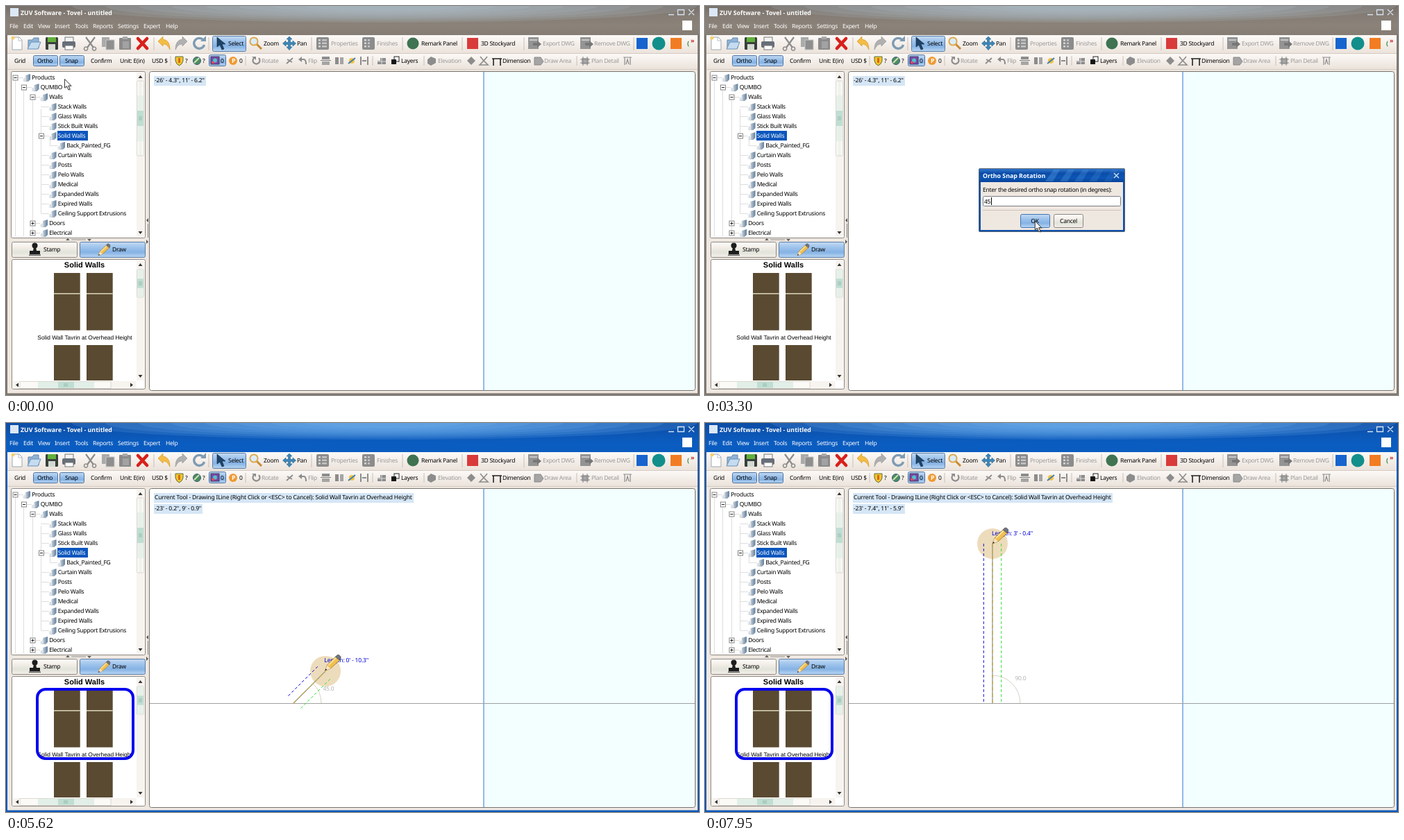
Write an HTML page that moves like this. It is 998x561 px and loops after 8 s.

```html
<!DOCTYPE html>
<html lang="en">
<head>
<meta charset="utf-8">
<title>Wall drawing</title>
<style>
html, body { margin: 0; width: 100%; height: 100%; overflow: hidden; background: #efe8e1; }
svg { position: absolute; left: 0; top: 0; width: 998px; height: 561px; }
svg text, .tip { font: 8.5px "Noto Sans", "Open Sans", sans-serif; letter-spacing: -.28px; text-rendering: geometricPrecision; white-space: pre; }
svg text.b { font-weight: 700; font-size: 8.8px; letter-spacing: 0; }
svg text.a { font: 8.4px "Liberation Sans", sans-serif; letter-spacing: 0; }
svg text.h { font: 700 11px "Liberation Sans", sans-serif; letter-spacing: 0; }
.mid { text-anchor: middle; }
.tip, svg #len { letter-spacing: -.17px; }
.tip { position: absolute; left: 213px; height: 14px; line-height: 14px; padding: 0 2px 0 1px; background: #d5e6f6; color: #000; }
</style>
</head>
<body>
<svg id="back" viewBox="0 0 998 561"></svg>
<div class="tip" id="tool" style="top:101px">Current Tool - Drawing ILine (Right Click or &lt;ESC&gt; to Cancel): Solid Wall Tavrin at Overhead Height</div>
<div class="tip" id="coord"></div>
<svg id="front" viewBox="0 0 998 561"></svg>
<script>
const $ = id => document.getElementById(id);
const R = (x, y, w, h, fill, more = '') => `<rect x="${x}" y="${y}" width="${w}" height="${h}" fill="${fill}" ${more}/>`;
const P = (d, fill = 'none', stroke = 'none', w = 1, more = '') => `<path d="${d}" fill="${fill}" stroke="${stroke}" stroke-width="${w}" ${more}/>`;
const C = (x, y, r, fill, more = '') => `<circle cx="${x}" cy="${y}" r="${r}" fill="${fill}" ${more}/>`;
const T = (x, y, s, fill = '#000', cls = '') => `<text x="${x}" y="${y}" fill="${fill}" class="${cls}">${s}</text>`;
const grad = (id, stops, dir = 'x2="0" y2="1"') => `<linearGradient id="${id}" ${dir}>` +
  stops.map((c, i) => `<stop offset="${i / (stops.length - 1)}" stop-color="${c}"/>`).join('') + '</linearGradient>';
const line = stroke => `stroke="${stroke}"`;
const GREY = '#8c8c8c', OFF = '#999';

const defs = '<defs>' +
  grad('bar', ['#fcfaf8', '#f4eee9', '#ebe3db']) +
  grad('btn', ['#fffefc', '#f3eee8', '#e2e4da', '#f4efea']) +
  grad('on', ['#c4daf2', '#9fc4ec', '#85b2e4', '#b9d6f3']) +
  grad('act', ['#0d4ca4', '#0c55b3', '#0b5cc0', '#0a5cc0']) +
  grad('idle', ['#77706a', '#857d75', '#8b8279', '#857c73']) +
  grad('dlg', ['#2f77cd', '#0b4ca8', '#0b56b6', '#0a4398']) +
  grad('leaf', ['#f4f6f8', '#b4bfca', '#5f7f9f'], 'x2="1" y2="0"') +
  grad('thumb', ['#fdfcfa', '#eef1ea', '#fdfcfa'], 'x2="1" y2="0"') +
  '</defs>';

// title bar with stepped glow, plus window edges
function frame(id, base, glow, edge) {
  let s = R(0, 0, 998, 42, `url(#${base})`);
  for (let i = 0; i < 8; i++)
    s += `<ellipse cx="545" cy="0" rx="${450 - i * 48}" ry="${24 - i * 2.4}" fill="${glow}" opacity=".17"/>`;
  s += R(0, 41, 2, 520, edge) + R(996, 41, 2, 520, edge) + R(0, 558.5, 998, 2.5, edge);
  return `<g id="${id}">${s}</g>`;
}

function titleText() {
  let s = R(6, 3, 12, 12, '#dce8f5') + T(21, 12.5, 'ZUV Software - Tovel - untitled', '#fff', 'b');
  const menu = { File: 5, Edit: 25, View: 46, Insert: 70, Tools: 99, Reports: 125, Settings: 161, Expert: 198, Help: 230 };
  for (const k in menu) s += T(menu[k], 32, k, '#fff');
  s += R(974, 21, 14, 14, '#fff');
  return s + P('M954 12.5H962M967.5 5.5H976.5V12.5H967.5ZM983 5L991 13M991 5L983 13', 'none', '#d5e2f0', 1.3);
}

function toolbar() {
  let s = R(2, 42, 994, 26, 'url(#bar)') + R(2, 68, 994, 23, 'url(#bar)') + P('M2 68.5H996M2 91.5H996', 'none', '#d5cbc2');
  for (const x of [213, 292, 440, 571, 657, 746, 904]) s += P(`M${x} 45V64`, 'none', '#c9c0b7');
  for (const x of [237, 345, 528, 602, 822]) s += P(`M${x} 72V86`, 'none', '#c9c0b7');
  // file and edit
  s += P('M9 45H19L23 49V63H9Z', '#fff', '#9aa7b5') + P('M18 45V50H23', 'none', '#b5c0cc') + C(10, 46, 2.5, '#f4cf6b');
  s += P('M32 49H38L40 46H47V61H32Z', '#8fb4d8', '#6588aa') + P('M31 62L36 52H50L46 62Z', '#c5dcf0', '#6a90b8');
  s += R(57, 45, 18, 18, '#39403c', 'rx="1.5"') + R(60, 45, 12, 7, '#62b13c') + R(61, 55, 10, 8, '#d4dad2');
  s += R(85, 45, 12, 7, '#f4f4f4', line('#777')) + R(81, 51, 19, 9, '#666e78', 'rx="2"') + R(85, 57, 12, 6, '#fff', line('#777'));
  s += P('M115 45L126 60M128 45L117 60', 'none', GREY, 2.2) + P('M115 59a2.6 2.6 0 1 0 .1 0M127 59a2.6 2.6 0 1 0 .1 0', 'none', GREY, 1.6);
  s += R(138, 45, 11, 14, '#aaa') + R(144, 49, 12, 14, '#8e8e8e', line('#c8c8c8'));
  s += R(163, 46, 17, 17, '#8b8b8b', 'rx="1"') + R(168, 44, 7, 4, '#aaa') + R(168, 51, 9, 10, '#a2a2a2');
  s += P('M190 47L203 61M203 47L190 61', 'none', '#d8201a', 4.6, 'stroke-linecap="round"');
  s += P('M219 51L226 44V48Q236 49 236 63Q232 54 226 55V58Z', '#f3bd45', '#d49a2c', .7);
  s += P('M261 51L254 44V48Q244 49 244 63Q248 54 254 55V58Z', '#b0b0b0', '#989898', .7);
  s += P('M284 49A7.5 7.5 0 1 0 285.5 56', 'none', '#7e9bb3', 3.4) + P('M280 51H288V43Z', '#7e9bb3');
  // view tools
  s += R(297.5, 43.5, 48, 22, 'url(#on)', 'rx="2" stroke="#5a7ea8"') + P('M304 45V59L308 56L311 63L314 62L311 55H316Z', '#1f4468', '#0d2740', .6);
  s += P('M361 55L368 62', 'none', '#c88a35', 3) + C(357, 51, 5.6, '#d9ecfa', 'stroke="#e0a94c" stroke-width="2"');
  s += P('M408 44L412 48H409.5V52.5H413V50L417.5 54L413 58V55.5H409.5V59H412L408 63.5L404 59H406.5V55.5H403V58L398.5 54L403 50V52.5H406.5V48H404Z', '#3c86b8', '#23618c', .6);
  for (const x of [447, 513]) {
    s += R(x, 45, 18, 18, GREY, 'rx="2"');
    for (let i = 0; i < 3; i++) s += R(x + 3, 48 + i * 4.5, 3, 2.5, '#d5d5d5') + R(x + 8, 48 + i * 4.5, x < 500 ? 7 : 3, 2.5, '#c5c5c5');
  }
  s += C(586, 54, 8.5, '#3f7351') + R(664, 46, 16, 16, '#d93a3a');
  for (const x of [752, 827]) s += R(x, 45, 15, 17, '#949494') + R(x + 2, 48, 11, 2, '#c7c7c7') + P(`M${x + 7} 53H${x + 13}V50L${x + 19} 55L${x + 13} 60V57H${x + 7}Z`, '#777');
  s += R(908, 46, 16, 16, '#1764cf') + C(940, 54, 9.5, '#128f8b') + R(957, 46, 16, 16, '#f27c22');
  s += T(981, 57, '(', '#278737', 'b') + T(986, 53, '»', '#c52222', 'b');
  for (const [x, txt, c] of [[320, 'Select'], [371, 'Zoom'], [419, 'Pan'], [468, 'Properties', OFF], [534, 'Finishes', OFF], [598, 'Remark Panel'],
    [684, '3D Stockyard'], [773, 'Export DWG', OFF], [847, 'Remove DWG', OFF]]) s += T(x, 57, txt, c);
  // second row
  for (const x of [39.5, 77.5]) s += R(x, 71.5, 35, 15, 'url(#on)', 'rx="2" stroke="#4f74a2"');
  s += R(292.5, 70.5, 24, 16, 'url(#on)', 'rx="2" stroke="#4f74a2"');
  s += P('M244 73H255V79Q254 84 249.5 86Q245 84 244 79Z', '#f2c52d', '#5b6e3d') + R(248, 75, 3, 7, '#d86a18');
  s += C(275, 79, 5.5, '#4c8d60', line('#3c607a')) + P('M271 82L278 75', 'none', '#cfe3b5', 2);
  s += R(295, 73, 12, 11, '#7b47a8', line('#383860')) + C(301, 78.5, 3, '#4fc1c8') + R(296, 80, 4, 3, '#e04a60');
  s += C(327, 79, 6, '#ee9a32') + T(325, 82, 'P', '#fff', 'b');
  s += P('M364 75A5 5 0 1 1 357 75', 'none', GREY, 2.2) + P('M354 73H360V78Z', GREY) + P('M404 83L413 75M405 77L412 81', 'none', GREY, 1.8);
  s += P('M424 77H429Q432 77 432 84', 'none', GREY, 2) + P('M421 77L426 73V81Z', GREY);
  s += R(455, 73, 11, 4, GREY) + R(455, 80, 11, 5, '#a5a5a5') + P('M453 78.5H468', 'none', '#777') + R(474, 74, 5, 10, GREY) + R(481, 74, 5, 10, '#a5a5a5');
  s += C(498, 79, 4, '#f2c33e') + P('M493 83L503 75', 'none', '#3d80b5', 2) + P('M511 73V85M521 73V85M513 79H519', 'none', GREY, 2);
  s += P('M535 84V79H539V75H547V84Z', GREY) + P('M541 75V84M535 80H547', 'none', '#ddd') + R(559, 73, 7, 7, '#fff', line('#222')) + R(555, 77, 7, 7, '#151515');
  s += P('M607 77L612 73L619 76V82L612 86L607 83Z', GREY) + P('M664 79L670 73L676 79L670 85Z', GREY) + P('M683 73L688 79L693 73M682 85L688 79L694 85Z', 'none', GREY, 1.6);
  s += P('M702 86V76M712 86V76M700 76H714', 'none', '#222', 1.6) + P('M761 74H770L774 80L770 85H761Z', '#a5a5a5', '#888');
  s += R(829, 75, 10, 9, '#a9a9a9') + P('M827 77H841M827 82H841M831 73V86M837 73V86', 'none', '#888') + P('M889 74H901M891 74V85M899 74V85M893 84L895 77L897 84', 'none', GREY, 1.2);
  for (const [x, txt, c] of [[12, 'Grid'], [45, 'Ortho'], [85, 'Snap'], [122, 'Confirm'], [164, 'Unit: E(in)'], [210, 'USD $'], [258, '?'], [283, '?'],
    [309, '0'], [336, '0'], [368, 'Rotate', OFF], [435, 'Flip', OFF], [569, 'Layers'], [622, 'Elevation', OFF], [715, 'Dimension'],
    [775, 'Draw Area', OFF], [843, 'Plan Detail', OFF]]) s += T(x, 82, txt, c);
  return s;
}

function scrollV(x, top, bot, t0, t1) {
  const m = (t0 + t1) / 2, g = Math.min(11, (t1 - t0) / 6);
  return R(x, top, 11, bot - top, '#f7f3ef') + R(x + .5, t0, 10, t1 - t0, 'url(#thumb)', 'stroke="#ddd8d0" rx="1"') +
    R(x + 1, m - 3 * g, 9, 6 * g, '#e1efe8', 'opacity=".7"') + R(x + 1, m - g, 9, 2 * g, '#bfded3') +
    P(`M${x + 3} ${m - 2}h5m-5 2h5m-5 2h5`, 'none', '#8fb5a8', .8) +
    P(`M${x + 2.5} ${top + 8}l3 -4l3 4ZM${x + 2.5} ${bot - 8}l3 4l3 -4Z`, '#333');
}

function tree() {
  let s = R(7.5, 94.5, 193, 240, '#fff', 'rx="2" stroke="#8d8883"');
  s += P('M13.5 107V333M25.5 121V333M38.5 135V327M50.5 149V299M63.5 191V201', 'none', '#bbb', 1, 'stroke-dasharray="1 1"');
  const rows = [['Products', 0, '-'], ['QUMBO', 1, '-'], ['Walls', 2, '-'], ['Stack Walls', 3], ['Glass Walls', 3], ['Stick Built Walls', 3],
    ['Solid Walls', 3, '-'], ['Back_Painted_FG', 4], ['Curtain Walls', 3], ['Posts', 3], ['Pelo Walls', 3], ['Medical', 3],
    ['Expanded Walls', 3], ['Expired Walls', 3], ['Ceiling Support Extrusions', 3], ['Doors', 2, '+'], ['Electrical', 2, '+']];
  rows.forEach(([name, lvl, mark], i) => {
    const y = 103 + 14 * i, x = 13 + 12.5 * lvl, sel = i === 6;
    s += P(`M${x} ${y + .5}h11`, 'none', '#bbb', 1, 'stroke-dasharray="1 1"');
    s += P(`M${x + 11} ${y + 2}l4 -2v-3l7 -2v8l-3 3h-8Z`, 'url(#leaf)') + P(`M${x + 15} ${y}v5`, 'none', '#fff', .7);
    if (mark) s += R(x - 3, y - 3, 7, 7, '#fff', line('#888')) + P(`M${x - 1.5} ${y + .5}h4` + (mark === '+' ? 'm-2 -2v4' : ''), 'none', '#222');
    if (sel) s += R(74, 180, 44, 14, '#0b56bd');
    s += T(x + 24.2, y + 3, name, sel ? '#fff' : '#000');
  });
  s += scrollV(188, 96, 333, 108, 216);
  return s + P('M86 338l3 -3l3 3ZM117 336l3 3l3 -3ZM205 306l-3 3l3 3ZM202 337l3 3l-3 3Z', '#555') + P('M94 337H115M204.5 314V334', 'none', '#888');
}

function palette() {
  let s = R(8.5, 340.5, 94, 22, 'url(#btn)', 'rx="2" stroke="#8d8883"') + R(106.5, 340.5, 94, 22, 'url(#on)', 'rx="2" stroke="#5b7fa8"');
  s += C(41.5, 345.5, 4, '#1d1d1d') + P('M40 348h3l1 5h5v5H34v-5h5Z', '#1d1d1d') + R(33, 358.5, 17, 1.5, '#555');
  s += T(54, 354, 'Stamp') + T(153, 354, 'Draw') + `<g transform="translate(133 360) scale(.75)">${pencil}</g>`;
  s += R(8.5, 365.5, 192, 187, '#fff', 'rx="2" stroke="#8d8883"') + T(113, 377, 'Solid Walls', '#000', 'h mid');
  for (const x of [69, 116]) s += R(x, 385, 37.7, 82.7, '#594a31') + R(x, 414, 37.7, 1.6, '#d5cfb5') + R(x, 489, 37.7, 51, '#594a31');
  s += T(113.5, 481, 'Solid Wall Tavrin at Overhead Height', '#000', 'a mid');
  s += scrollV(188, 367, 540, 380, 420);
  s += R(9.5, 541, 178, 11, '#f7f3ef') + R(20, 541.5, 131, 10, '#fbfaf7', line('#ddd8d0')) + R(46, 542, 81, 9, '#e1efe8') + R(75, 542, 23, 9, '#bfded3');
  return s + P('M84 544v5m2 -5v5m2 -5v5', 'none', '#8fb5a8', .8) + P('M18 543.5l-4 3l4 3ZM179 543.5l4 3l-4 3Z', '#333');
}

const canvasArea = () => R(206.5, 94.5, 786, 460, '#fff', 'rx="3"') + R(689, 95, 303, 459, '#f3fefe') +
  R(687, 95, 2, 459, '#91bce6') + R(206.5, 94.5, 786, 460, 'none', 'rx="3" stroke="#77736f"');

function dialog() {
  let s = R(394.5, 234.5, 210, 91, '#0b4fae', 'stroke="#5d6875" rx="1"') + R(395, 235, 209, 19, 'url(#dlg)');
  for (let i = 0; i < 5; i++) s += P(`M${490 + i * 21} 253l12 -17h9l-10 17Z`, '#5fa2e6', 'none', 1, `opacity="${.35 - i * .05}"`);
  s += T(400, 248, 'Ortho Snap Rotation', '#fff', 'b') + P('M589 241L596 248M596 241L589 248', 'none', '#c6daf2', 1.5);
  s += R(397, 254, 205, 69, '#efe8e1') + T(400, 268, 'Enter the desired ortho snap rotation (in degrees):');
  s += R(400.5, 274.5, 198, 14, '#fff', 'rx="2" stroke="#777d86"') + P('M400 294.5H599', 'none', '#cbc2b9');
  s += R(454.5, 300.5, 42, 19, 'url(#btn)', 'id="ok" rx="2" stroke="#3f74b4"') + R(502.5, 300.5, 42, 19, 'url(#btn)', 'rx="2" stroke="#8a8580"');
  s += T(475, 313, 'OK', '#000', 'mid') + T(523.5, 313, 'Cancel', '#000', 'mid');
  s += R(402, 276, 22, 11, '#0b56bd', 'id="mark"') + '<text id="value" x="402" y="284.5"></text>' + R(412, 276, 1, 11, '#000', 'id="caret"');
  return `<g id="dialog">${s}</g>`;
}

const pencil = P('M0 0L3 -8L16 -21L22 -16L8 -3Z', '#f2bf4f', '#8c6a2c', .7) + P('M3 -8L8 -3L0 0Z', '#f7e3c0') + P('M0 0L1.2 -3L3 -1.2Z', '#222') +
  P('M5 -8L17 -19.5', 'none', '#fce6a0', 1.8) + P('M15 -20L18 -23Q21 -23.5 23 -19.5L21 -15Z', '#6f7480', '#444', .6);
const arrow = P('M1.5 2V15L5 12L8 17.5L10 16.5L7.5 11.5H12Z', '#000', 'none', 1, 'opacity=".2"') +
  P('M.5 .5V13L3.5 10.5L6 16L8 15L5.8 10H9.8Z', '#fff', '#222', .9);

$('back').innerHTML = defs + R(0, 0, 998, 561, '#efe8e1') + frame('idleBar', 'idle', '#b3c0cf', '#7f766d') + frame('actBar', 'act', '#79b6f4', '#0a57b8') +
  titleText() + toolbar() + tree() + palette() + canvasArea();
$('front').innerHTML = R(45, 384, 138, 100, 'none', 'id="pick" rx="12" stroke="#0505ee" stroke-width="4"') +
  `<g id="snap">${P('M207 404.5H992', 'none', '#a0a0a0')}<path id="arc" fill="none" stroke="#d6d2c8"/><text id="deg" fill="#b4b4b4"></text>
   ${C(0, 0, 22, '#dcb978', 'id="spot" opacity=".5"')}</g>
   <g id="wall" fill="none">${['main', 'dash', 'left', 'right'].map(k => `<path id="${k}"/>`).join('')}<text id="len" fill="#0000dc"></text></g>` +
  dialog() + `<g id="arrow">${arrow}${C(15.5, 8, 3.5, 'none', 'id="busy" stroke="#4aa5d8" stroke-width="2"')}</g><g id="pencil">${pencil}</g>`;

const show = (id, on) => { $(id).style.display = on ? '' : 'none'; };
const set = (id, o) => { for (const k in o) $(id).setAttribute(k, o[k]); };
const pen = (id, stroke, width, dash) => set(id, { stroke, 'stroke-width': width, 'stroke-dasharray': dash });
pen('main', '#8f8f78', 1.2, 'none');
pen('dash', '#c4ac4a', 1.2, '5 4');
pen('left', '#1010d8', 1, '4 3');
pen('right', '#2fe02f', 1, '4 3');

// pointer path: time, x, y, easing into that point
const ease = { l: p => p, i: p => p ** 1.4, o: p => 1 - (1 - p) ** 1.6, b: p => p * p * (3 - 2 * p) };
const path = [[0, 84, 105], [60, 84, 105], [400, 61, 79, 'o'], [810, 61, 79], [1110, 276, 164, 'b'], [2570, 276, 164], [3360, 478, 312, 'b'],
  [3420, 478, 312], [3910, 218.7, 429.4, 'i'], [4210, 109, 441, 'o'], [4470, 109, 441], [4950, 405.8, 396.6, 'b'], [5260, 414, 404, 'o'],
  [5320, 414, 404], [6220, 588, 224.6, 'b'], [6750, 588, 224.6], [7110, 513.5, 188.8, 'i'], [7590, 452, 177, 'l'], [7950, 414, 174, 'o'], [8000, 414, 174]];
function pointer(t) {
  const i = path.findIndex(k => k[0] > t), [t0, x0, y0] = path[i - 1], [t1, x1, y1, e = 'l'] = path[i];
  const p = ease[e]((t - t0) / (t1 - t0));
  return [x0 + (x1 - x0) * p, y0 + (y1 - y0) * p];
}

const SCALE = 6.32, AX = 414, AY = 404;
function feet(v) {
  const n = Math.round(Math.abs(v) * 10);
  return `${v < 0 ? '-' : ''}${Math.floor(n / 120)}' - ${(n % 120 / 10).toFixed(1)}"`;
}
const place = ([x, y]) => `${feet((x - 414) / SCALE - 283.4)}, ${feet(137.9 - (y - 174) / SCALE)}`;
// last canvas position before the pointer crosses into the palette
let exitT = 3910;
while (pointer(exitT)[0] > 207) exitT++;

function drawWall(t, x, y) {
  const dx = x - AX, dy = AY - y, raw = Math.atan2(dy, dx), step = Math.PI / 4;
  const near = Math.round(raw / step) * step, snapped = Math.abs(raw - near) < Math.PI / 18;
  const a = snapped ? near : raw, size = Math.hypot(dx, dy) * Math.cos(raw - a);
  const on = t >= 5320 && size > 4;
  show('wall', on);
  show('snap', on && snapped);
  if (!on) return;
  const c = Math.cos(a), s = Math.sin(a), ex = AX + size * c, ey = AY - size * s;
  const seg = (off, from) => `M${AX + from * c - off * s} ${AY - from * s - off * c}L${ex - off * s} ${ey - off * c}`;
  set('main', { d: seg(0, 0) });
  set('dash', { d: seg(0, 0) });
  set('left', { d: seg(12.7, 2) });
  set('right', { d: seg(-12.7, 2) });
  set('len', { x: x - 1, y: y - 12 });
  $('len').textContent = 'Length: ' + feet(size / SCALE);
  set('spot', { cx: ex, cy: ey });
  show('spot', size > 16);
  set('arc', { d: `M${AX + 40} ${AY}A40 40 0 0 0 ${AX + 40 * c} ${AY - 40 * s}` });
  set('deg', { x: AX + 46 * Math.cos(a / 2), y: AY - 46 * Math.sin(a / 2) });
  $('deg').textContent = (a * 180 / Math.PI).toFixed(1);
}

function render(t) {
  const [x, y] = pointer(t), open = t >= 550 && t < 3420, active = t >= 3420 || (t >= 430 && t < 550);
  show('actBar', active);
  show('idleBar', !active);
  show('dialog', open);
  if (open) {
    const typed = t >= 1910;
    $('value').textContent = t >= 2110 ? '45' : typed ? '4' : '90.0';
    set('value', { fill: typed ? '#000' : '#fff' });
    show('mark', !typed);
    set('caret', { x: t >= 2110 ? 412 : typed ? 407 : 424 });
    show('caret', typed ? t < 2610 || t >= 3110 : t >= 1010 && t < 1510);
    set('ok', { fill: y > 300 ? 'url(#on)' : 'url(#btn)' });
  }
  show('pick', t > 3910 && x < 185 || t >= 4270);
  const tool = t >= 4470;
  show('tool', tool);
  $('coord').style.top = tool ? '117px' : '101px';
  $('coord').textContent = t < 3420 ? `-26' - 4.3", 11' - 6.2"` : place(x > 207 ? [x, y] : pointer(exitT - 1));
  const drawing = tool && x > 207;
  show('pencil', drawing);
  show('arrow', !drawing);
  show('busy', t >= 4270 && t < 4470);
  set(drawing ? 'pencil' : 'arrow', { transform: `translate(${x} ${y})` });
  drawWall(t, x, y);
}

const start = performance.now();
function tick() {
  render((performance.now() - start) % 8000);
  requestAnimationFrame(tick);
}
tick();
</script>
</body>
</html>
```
